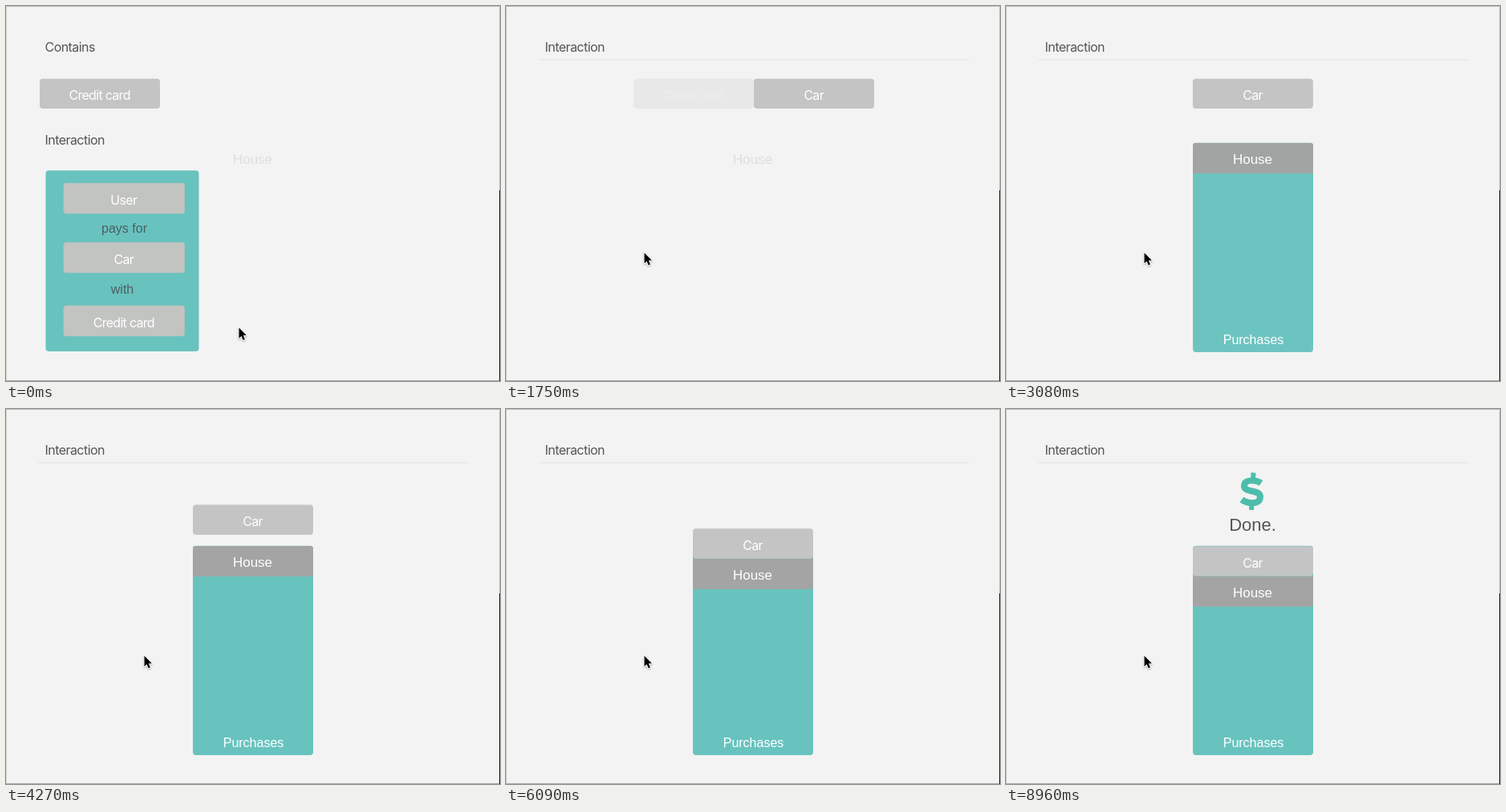
Write an HTML page with a canvas that moves like this. It is 616 px wide and 468 px high and loops after 9030 ms.

```html
<!DOCTYPE html>
<html lang="en">
<head>
<meta charset="utf-8">
<title>Interaction</title>
<style>
  html, body { margin: 0; width: 100%; height: 100%; overflow: hidden; background: #f3f3f3; }
  canvas { display: block; }
</style>
</head>
<body>
<canvas id="stage" width="616" height="468"></canvas>
<script>
const ctx = document.getElementById('stage').getContext('2d');
const LOOP = 9030;
const BG = '#f3f3f3', TEAL = '#68c3bf', CARD = '#c4c4c4', DARK = '#a4a4a4', INK = '#555';
const UI = 'Inter, sans-serif', PLAIN = '"Liberation Sans", Arial, sans-serif';
const CARD_W = 150, CARD_H = 37.4, TOP = 90.7, SLOT_X = 233;

const clamp = v => Math.max(0, Math.min(1, v));
const mix = (a, b, p) => a + (b - a) * p;

// Damped spring, tension 400 and friction 20; ms in, progress out.
function spring(ms) {
  if (ms <= 0) return 0;
  const t = ms / 1000, w = Math.sqrt(300);
  return 1 - Math.exp(-10 * t) * (Math.cos(w * t) + 10 / w * Math.sin(w * t));
}

function bezier(x1, y1, x2, y2) {
  const at = (a, b, s) => 3 * a * s * (1 - s) ** 2 + 3 * b * s * s * (1 - s) + s ** 3;
  return x => {
    x = clamp(x);
    let lo = 0, hi = 1;
    for (let i = 0; i < 24; i++) {
      const mid = (lo + hi) / 2;
      if (at(x1, x2, mid) < x) lo = mid; else hi = mid;
    }
    return at(y1, y2, (lo + hi) / 2);
  };
}
const ease = bezier(.25, .1, .25, 1);
const easeInOut = bezier(.42, 0, .58, 1);

// Smooth path through [time, value] points.
function follow(points, t) {
  const n = points.length - 1;
  if (t <= points[0][0]) return points[0][1];
  if (t >= points[n][0]) return points[n][1];
  const i = points.findIndex(p => p[0] > t) - 1;
  const slope = k => k <= 0 || k >= n ? 0 :
    (points[k + 1][1] - points[k - 1][1]) / (points[k + 1][0] - points[k - 1][0]);
  const [t0, v0] = points[i], [t1, v1] = points[i + 1];
  const d = t1 - t0, s = (t - t0) / d;
  return v0 * (1 + 2 * s) * (1 - s) ** 2 + v1 * s * s * (3 - 2 * s)
    + d * (slope(i) * s * (1 - s) ** 2 + slope(i + 1) * s * s * (s - 1));
}
const descent = [[3440, TOP], [3800, 106], [4270, 119.6], [5250, 134.6],
                 [6160, 150.6], [7070, 168], [7280, 170.1], [7700, 171.2]];

function fade(alpha, draw) {
  if (alpha <= 0) return;
  ctx.save();
  ctx.globalAlpha *= Math.min(1, alpha);
  draw();
  ctx.restore();
}

function box(x, y, w, h, color, r = 4) {
  ctx.fillStyle = color;
  ctx.beginPath();
  ctx.roundRect(x, y, w, h, r);
  ctx.fill();
}

function label(text, x, y, font, color, align = 'center', spacing = 0) {
  ctx.font = font;
  ctx.fillStyle = color;
  ctx.textAlign = align;
  ctx.letterSpacing = spacing + 'px';
  ctx.fillText(text, x, y);
}

function card(text, x, y, color = CARD) {
  box(x, y, CARD_W, CARD_H, color);
  label(text, x + 74.6, y + 26.5, '400 16px ' + UI, '#fff', 'center', -.7);
}

function heading(text, y) {
  label(text, 48.5, y, '400 16px ' + UI, INK, 'left', -.55);
}

function recipe() {
  heading('Contains', 57);
  heading('Interaction', 173);
  box(49.5, 205.3, 191, 225.7, TEAL);
  [['User', 221], ['Car', 295], ['Credit card', 374]].forEach(([text, y]) => {
    box(71.5, y - .3, 151.5, 38.6, '#b4bfbb');
    card(text, 72.2, y + .3, '#c2c4c1');
  });
  label('pays for', 147.5, 283, '16px ' + PLAIN, '#4b5f5f');
  label('with', 145, 359, '16px ' + PLAIN, '#4b5f5f');
}

function purchases(t, carY) {
  const p = ease((t - 2455) / 800);
  if (p <= 0) return;
  const y = Math.max(171, carY + 37.5);
  fade(p, () => {
    box(SLOT_X, 170.7, CARD_W, 261.3, TEAL);
    box(SLOT_X, y, CARD_W, 38, DARK, y > 172 ? [0, 0, 4, 4] : [3, 3, 0, 0]);
  });
  const tone = Math.round(mix(222, 255, p));
  label('House', 307.5, y + 26, '17px ' + PLAIN, `rgb(${tone},${tone},${tone})`);
  fade(p * 14, () => label('Purchases', 308.5, 422, '16px ' + PLAIN, '#fff'));
}

function dollar() {
  ctx.strokeStyle = '#4dbdab';
  ctx.lineWidth = 8;
  ctx.lineJoin = 'round';
  ctx.stroke(new Path2D('M318 92.5C312 88.5 297 87 297 96C297 105 317 100 317 109.5C317 120 301 118.5 294 113'));
  ctx.lineWidth = 6;
  ctx.stroke(new Path2D('M308.5 79.5L308 89M306.5 116L306 126'));
}

function cursor(x, y) {
  ctx.save();
  ctx.translate(x, y);
  const arrow = new Path2D('M0 0V13.3L3 10.5L5.2 15.6L7.4 14.6L5.3 9.6H9.4Z');
  ctx.lineJoin = 'round';
  ctx.strokeStyle = '#fff';
  ctx.lineWidth = 2;
  ctx.shadowColor = 'rgba(0,0,0,.3)';
  ctx.shadowBlur = 2;
  ctx.shadowOffsetY = 1;
  ctx.stroke(arrow);
  ctx.shadowColor = 'transparent';
  ctx.fillStyle = '#000';
  ctx.fill(arrow);
  ctx.restore();
}

function windowEdge() {
  const bar = (x, y, w, h, color) => { ctx.fillStyle = color; ctx.fillRect(x, y, w, h); };
  bar(0, 0, 616, 1, '#b9b9b9');
  bar(0, 0, 1, 468, '#d2d2d2');
  bar(0, 467, 616, 1, '#a8a8a8');
  bar(615, 0, 1, 230, '#c3c2cc');
  bar(615, 230, 1, 238, '#25252b');
}

function draw(t) {
  ctx.fillStyle = BG;
  ctx.fillRect(0, 0, 616, 468);

  const swap = ease((t - 480) / 380);
  const join = spring(t - 1048);
  const shift = spring(t - 2454.5);
  const carX = mix(mix(426, 309, join), SLOT_X, shift);
  const carY = follow(descent, t);

  fade(1 - swap, recipe);
  fade(swap, () => {
    heading('Interaction', 57);
    ctx.fillStyle = '#e3e3e3';
    ctx.fillRect(40, 66.5, 537.5, 1);
  });

  purchases(t, carY);
  fade(1 - spring(t - 1660), () =>
    card('Credit card', mix(42, 159, join), TOP, swap > 0 ? CARD : '#c2c4c1'));
  fade(swap, () => card('Car', carX, carY));

  fade(ease((t - 7780) / 1180), dollar);
  fade(ease((t - 7780) / 900), () => label('Done.', 307.5, 151.5, '22px ' + PLAIN, INK));

  const reach = easeInOut((t - 20) / 460);
  cursor(mix(290.5, 172.5, reach), mix(401.5, 308, reach));
  windowEdge();
}

function tick() {
  draw(performance.now() % LOOP);
  requestAnimationFrame(tick);
}
tick();
</script>
</body>
</html>
```
